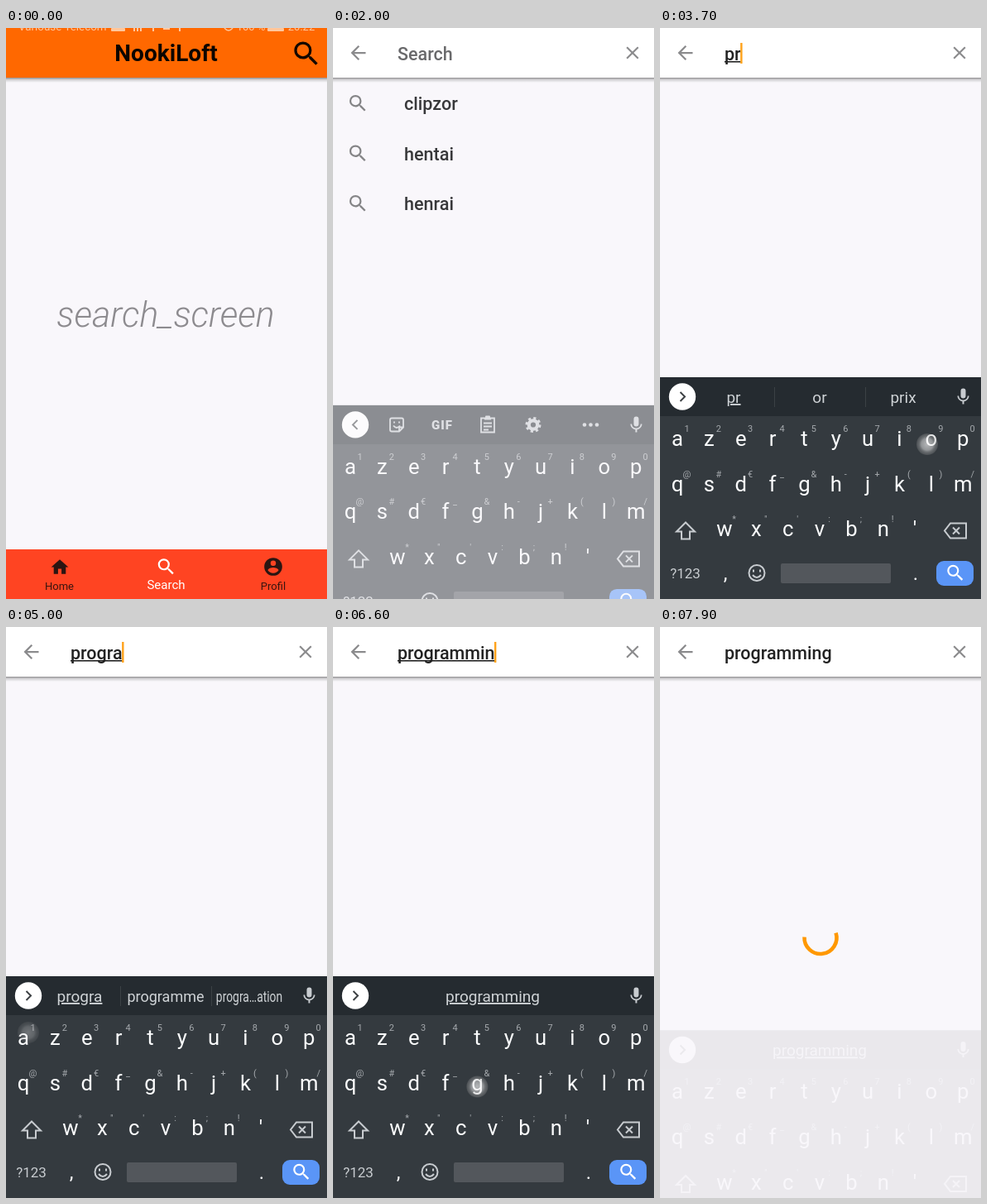
Animation of 388 by 690 pixels, one loop 8000 ms. Source, as an HTML page:

```html
<!DOCTYPE html>
<html lang="en">
<head>
<meta charset="utf-8">
<title>Search screen</title>
<style>
html, body { margin: 0; width: 100%; height: 100%; overflow: hidden; background: #f9f7fb; }
svg { display: block; width: 100%; height: 100%; font-family: Roboto, sans-serif; }
.u { text-decoration: underline; text-decoration-thickness: 1.3px; text-underline-offset: 2px; text-decoration-skip-ink: none; }
text { white-space: pre; }
</style>
</head>
<body>
<svg id="stage" viewBox="0 0 388 690">
  <defs>
    <linearGradient id="shade" x2="0" y2="1">
      <stop offset="0" stop-color="#000" stop-opacity=".42"/>
      <stop offset=".4" stop-color="#000" stop-opacity=".16"/>
      <stop offset="1" stop-color="#000" stop-opacity="0"/>
    </linearGradient>
    <radialGradient id="glow">
      <stop offset="0" stop-color="#fff" stop-opacity=".75"/>
      <stop offset=".55" stop-color="#eee" stop-opacity=".6"/>
      <stop offset=".75" stop-color="#bbb" stop-opacity=".45"/>
      <stop offset="1" stop-color="#999" stop-opacity=".3"/>
    </radialGradient>
  </defs>
  <rect width="388" height="690" fill="#f9f7fb"/>
  <g id="home"></g>
  <g id="page"></g>
  <g id="list"></g>
  <g id="spin"><path id="arc" fill="none" stroke="#ff9800" stroke-width="4.6"/></g>
  <g id="board"></g>
  <circle id="touch" r="13" fill="url(#glow)"/>
</svg>
<script>
const $ = id => document.getElementById(id);
const NS = 'http://www.w3.org/2000/svg';
const LOOP = 8000;

function add(parent, tag, attrs, content) {
  const el = document.createElementNS(NS, tag);
  for (const k in attrs) el.setAttribute(k, attrs[k]);
  if (content !== undefined) el.textContent = content;
  return parent.appendChild(el);
}
const set = (el, attrs) => { for (const k in attrs) el.setAttribute(k, attrs[k]); };
const show = (el, on) => el.setAttribute('display', on ? 'inline' : 'none');
const clamp = x => Math.max(0, Math.min(1, x));

const ICON = {
  search: 'M15.5 14h-.79l-.28-.27A6.47 6.47 0 0 0 16 9.5 6.5 6.5 0 1 0 9.5 16c1.61 0 3.09-.59 4.23-1.57l.27.28v.79l5 4.99L20.49 19zm-6 0a4.5 4.5 0 1 1 0-9 4.5 4.5 0 0 1 0 9z',
  home: 'M10 20v-6h4v6h5v-8h3L12 3 2 12h3v8z',
  user: 'M12 2a10 10 0 1 0 0 20 10 10 0 0 0 0-20zm0 3a3 3 0 1 1 0 6 3 3 0 0 1 0-6zm0 14.2a7.2 7.2 0 0 1-6-3.22c.03-1.99 4-3.08 6-3.08s5.97 1.09 6 3.08a7.2 7.2 0 0 1-6 3.22z',
  back: 'M20 11H7.83l5.59-5.59L12 4l-8 8 8 8 1.41-1.41L7.83 13H20z',
  close: 'M19 6.41L17.59 5 12 10.59 6.41 5 5 6.41 10.59 12 5 17.59 6.41 19 12 13.41 17.59 19 19 17.59 13.41 12z',
  mic: 'M12 14a3 3 0 0 0 3-3V5a3 3 0 0 0-6 0v6a3 3 0 0 0 3 3zm5.3-3c0 3-2.54 5.1-5.3 5.1S6.7 14 6.7 11H5c0 3.41 2.72 6.23 6 6.72V21h2v-3.28c3.28-.48 6-3.3 6-6.72z'
};
const icon = (parent, name, x, y, size, fill) => add(parent, 'path', {
  d: ICON[name], fill, transform: `translate(${x - size / 2} ${y - size / 2}) scale(${size / 24})`
});
const label = (parent, s, x, y, size, fill, more) => add(parent, 'text',
  { x, y, 'font-size': size, fill, 'text-anchor': 'middle', ...more }, s);
const rect = (parent, x, y, width, height, fill, rx = 0) =>
  add(parent, 'rect', { x, y, width, height, fill, rx });
const line = (parent, d, stroke, width = 2) =>
  add(parent, 'path', { d, fill: 'none', stroke, 'stroke-width': width });
const START = { 'text-anchor': 'start' };

// Home screen
const home = $('home');
rect(home, 0, 60, 388, 6, 'url(#shade)');
rect(home, 0, 0, 388, 60, '#ff6800');
label(home, 'Varlouse Telecom', 15, 3, 13.4, '#ffc79c', START);
rect(home, 127, 0, 17, 4, '#ffc79c', 1);
line(home, 'M155 0v4M159 0v4M163 0v4M178 0v4M190 1h8M210 0v4', '#ffc79c');
line(home, 'M264 0q5 6 10 0', '#ffc79c', 1.5);
label(home, '100 %', 296, 3, 13, '#ffc79c');
rect(home, 316, 0, 20, 4, '#ffc79c', 1);
label(home, '20:22', 357, 3, 13, '#ffc79c');
label(home, 'NookiLoft', 193.5, 40, 28, '#0c0500', { 'font-weight': 700 });
icon(home, 'search', 363, 31, 39, '#140800');
label(home, 'search_screen', 193, 360.5, 43, '#8d8b8f', { 'font-weight': 300, 'font-style': 'italic' });
rect(home, 0, 630, 388, 60, '#ff4422');
icon(home, 'home', 65, 651.5, 25, '#2b1512');
icon(home, 'search', 193.5, 651, 26, '#fff');
icon(home, 'user', 323, 651, 26, '#2b1512');
label(home, 'Home', 64.5, 678.5, 13, '#3a1510');
label(home, 'Search', 193.5, 678, 15, '#fff');
label(home, 'Profil', 323, 678.5, 13, '#3a1510');

// Search page
const page = $('page');
rect(page, 0, 60, 388, 6, 'url(#shade)');
rect(page, 0, 0, 388, 60, '#fff');
icon(page, 'back', 30.5, 30, 27, '#8b8b8d');
icon(page, 'close', 362, 30, 26, '#8b8b8d');
const input = label(page, '', 78, 38.7, 21.5, '#222', { ...START, 'font-weight': 500 });
const under = rect(page, 78, 40, 0, 1.6, '#222');
const caret = rect(page, 78, 18, 2.4, 25, '#ffa21a');

['clipzor', 'hentai', 'henrai'].forEach((s, i) => {
  const y = 91 + i * 60.5;
  icon($('list'), 'search', 30, y, 27, '#858587');
  label($('list'), s, 86, y + 8, 21.6, '#38383a', { ...START, 'font-weight': 500 });
});

// Keyboard
const board = $('board');
const INK = '#fbfcfd', DIM = '#a5a9ad', SOFT = '#c8ccd0';
const keys = {};
rect(board, 0, 422, 388, 270, '#343a3f');
rect(board, 0, 422, 388, 47, '#252b30');

const rows = [
  ['azertyuiop', '1234567890', 21, 504.7],
  ['qsdfghjklm', '@#€_&-+()/', 21, 559.5],
  ["wxcvbn'", '*"\':;!', 78, 614.3]
];
for (const [chars, hints, x0, y] of rows) {
  [...chars].forEach((c, i) => {
    const x = x0 + i * 38.35;
    keys[c] = [x, y - 4];
    label(board, c, x, y, 25.7, INK);
    if (hints[i]) label(board, hints[i], x + 11.5, y - 17, 11, DIM);
  });
}
line(board, 'M31 597.5l11 11h-6v9h-10v-9h-6z', SOFT);
line(board, 'M351 598.5h19v18h-19l-7-9zM354 603.5l8 8M362 603.5l-8 8', SOFT);
label(board, '?123', 30.5, 665, 17, SOFT);
label(board, ',', 79, 667, 24, INK);
label(board, '.', 309, 667, 24, INK);
add(board, 'circle', { cx: 117, cy: 658.5, r: 9.5, fill: 'none', stroke: SOFT, 'stroke-width': 2 });
line(board, 'M112 661q5 6 10 0M113 654.5v3M121 654.5v3', SOFT);
rect(board, 146, 647, 133, 24, '#53575c', 2);
rect(board, 334, 644, 45, 30, '#5a95f7', 9);
icon(board, 'search', 357, 658.5, 26, '#fff');
add(board, 'circle', { cx: 27, cy: 445.5, r: 16.2, fill: '#fff' });
const chevron = line(board, '', '#3c4043', 2);
icon(board, 'mic', 366.5, 445.5, 24, SOFT);

const tools = add(board, 'g', { transform: 'translate(0 .6)' });
line(tools, 'M71 437h12q2 0 2 2v9l-5 5h-9q-2 0-2-2v-12q0-2 2-2zM85 448h-5v5M73 446q4 5 8 0M74 441v2M80 441v2', SOFT, 1.8);
label(tools, 'GIF', 132, 450, 15, SOFT, { 'font-weight': 900, 'letter-spacing': 1 });
line(tools, 'M179 437h16v17h-16zM183 438h8M182 443h10M182 447h10M182 451h6', SOFT, 1.8);
rect(tools, 184, 434, 6, 4, SOFT, 1);
add(tools, 'circle', { cx: 242, cy: 445, r: 5.2, fill: 'none', stroke: SOFT, 'stroke-width': 4.2 });
add(tools, 'circle', { cx: 242, cy: 445, r: 8, fill: 'none', stroke: SOFT, 'stroke-width': 3, 'stroke-dasharray': Math.PI });
for (const x of [304, 311.5, 319]) add(tools, 'circle', { cx: x, cy: 445, r: 2.3, fill: SOFT });

const strip = add(board, 'g', {});
const rules = line(strip, 'M138.5 434v24M248.5 434v24', '#3b4145', 1);
const SLOT_X = [89, 193, 294];
const slots = SLOT_X.map(() => label(strip, '', 0, 453, 19, '#cfd3d6'));
slots[0].setAttribute('class', 'u');

// Typed keys: press time and the character
const WORD = 'programming';
const presses = [2850, 3200, 3680, 4130, 4520, 4850, 5480, 5750, 6120, 6360, 6570];
const LAG = 80;
const taps = presses.map((at, i) => {
  const [x, y] = keys[WORD[i]];
  return { at, x, y };
});
Object.assign(taps[2], { x: 323, y: 503 });
Object.assign(taps[5], { x: 27, y: 490 });
taps.push({ at: 1000, x: 363, y: 31 }, { at: 7350, x: 358, y: 657 });

const guesses = [
  ['pour', 'pas'], ['or', 'prix'], ['prof', 'problème'], ['programme', 'progrès'],
  ['programme', 'progrès'], ['programme', 'progra…ation'], ['programme', 'progra…ation'],
  ['programme', 'progra…ation'], ['programming', 'programme']
];

function setSlot(i, s) {
  // Long words are squeezed the way the keyboard does it
  const squeeze = s.length > 9 ? 0.73 : 1;
  slots[i].textContent = s;
  set(slots[i], {
    transform: `translate(${SLOT_X[i]} 0) scale(${squeeze} 1)`,
    'font-size': s.length > 7 && squeeze === 1 ? 18 : 19
  });
}

function drawStrip(n) {
  show(tools, n === 0);
  show(strip, n > 0);
  chevron.setAttribute('d', n ? 'M24.5 440l5.5 5.5-5.5 5.5' : 'M29.5 440l-5.5 5.5 5.5 5.5');
  if (!n) return;
  const single = n > 9;
  show(rules, !single);
  slots[1].setAttribute('class', single ? 'u' : '');
  slots[1].setAttribute('fill', n === 8 ? '#fff' : '#cfd3d6');
  if (single) {
    setSlot(0, '');
    setSlot(2, '');
    slots[1].textContent = WORD;
    set(slots[1], { transform: `translate(${SLOT_X[1]} 0)`, 'font-size': 19 });
  } else {
    [WORD.slice(0, n), ...guesses[n - 1]].forEach((s, i) => setSlot(i, s));
  }
}

function drawInput(t, n) {
  const done = t >= 7580;
  input.textContent = n ? WORD.slice(0, n) : 'Search';
  input.setAttribute('fill', n ? '#222' : '#69696b');
  const w = n ? input.getComputedTextLength() : 0;
  under.setAttribute('width', done ? 0 : w);
  const since = n ? t - presses[n - 1] - LAG : t - 2400;
  show(caret, !done && since >= 0 && since < 500);
  caret.setAttribute('x', 77.5 + w);
}

// Cubic bezier (.4, 0, .2, 1)
function ease(x) {
  let lo = 0, hi = 1, u = x;
  for (let i = 0; i < 20; i++) {
    u = (lo + hi) / 2;
    const v = 1 - u;
    if (1.2 * v * v * u + 0.6 * v * u * u + u ** 3 < x) lo = u; else hi = u;
  }
  return 3 * (1 - u) * u * u + u ** 3;
}

function drawSpinner(t) {
  const s = t - 7585;
  show($('spin'), s >= 0);
  if (s < 0) return;
  const p = (s / 1333) % 1;
  const head = 270 * ease(clamp(p * 2)), tail = 270 * ease(clamp(p * 2 - 1));
  const a = -90 + tail + s / 2222 * 360 + p * 90;
  const sweep = Math.max(head - tail, 0.1);
  const at = deg => {
    const r = deg * Math.PI / 180;
    return `${194 + 19.5 * Math.cos(r)} ${375.5 + 19.5 * Math.sin(r)}`;
  };
  $('arc').setAttribute('d', `M${at(a)}A19.5 19.5 0 ${sweep > 180 ? 1 : 0} 1 ${at(a + sweep)}`);
}

function drawTouch(t) {
  const tap = taps.find(p => t >= p.at && t < p.at + 230);
  show($('touch'), !!tap);
  if (!tap) return;
  set($('touch'), { cx: tap.x, cy: tap.y, opacity: 0.85 * clamp((230 - (t - tap.at)) / 170) });
}

function draw(t) {
  const n = presses.filter(p => t >= p + LAG).length;
  const open = t >= 1400;
  show(home, !open);
  show(page, open);
  show($('list'), open && n === 0);
  const a = clamp((t - 1885) / 225) * clamp((7915 - t) / 215);
  show(board, a > 0);
  set(board, { opacity: a, transform: `translate(0 ${70 * (1 - a)})` });
  drawInput(t, n);
  drawStrip(n);
  drawSpinner(t);
  drawTouch(t);
}

function tick() {
  draw(performance.now() % LOOP);
  requestAnimationFrame(tick);
}
tick();
</script>
</body>
</html>
```
